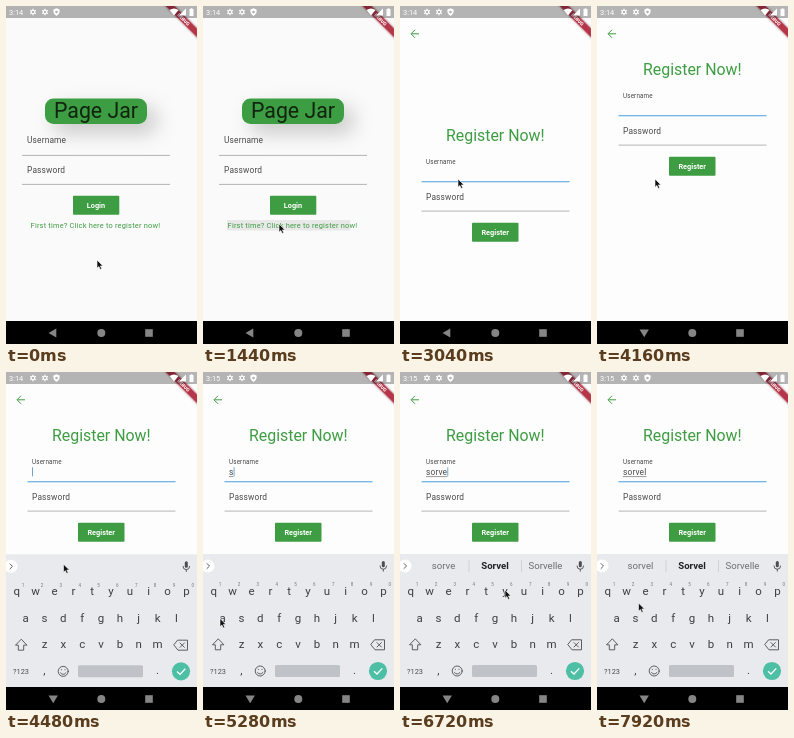
Write an HTML page that moves like this. It is 191 by 338 pixels and loops after 8 s.

```html
<!DOCTYPE html>
<html lang="en">
<head>
<meta charset="utf-8">
<title>Sign-up screen</title>
<style>
html, body { margin: 0; width: 100%; height: 100%; overflow: hidden; background: #fafafa; }
svg { display: block; width: 100vw; height: 100vh; font-family: Roboto, sans-serif; }
.mid { text-anchor: middle; }
.label { font-size: 8.4px; letter-spacing: .15px; fill: #4a4a4a; }
.btn { font-size: 7.3px; font-weight: 700; fill: #fff; text-anchor: middle; }
.green { fill: #3e9d42; }
.rule { stroke: #969696; stroke-width: .7; }
.icon { fill: none; stroke: #4a4e52; stroke-width: .9; stroke-linejoin: round; stroke-linecap: round; }
.key { font-size: 11.5px; fill: #3c4044; text-anchor: middle; }
.digit { font-size: 4.5px; fill: #74787c; text-anchor: middle; }
.hint { font-size: 9.6px; fill: #6a6e73; text-anchor: middle; }
</style>
</head>
<body>
<svg viewBox="0 0 191 338" preserveAspectRatio="none">
  <defs>
    <filter id="glow" x="-50%" y="-150%" width="200%" height="400%">
      <feDropShadow dx="9" dy="9" stdDeviation="10" flood-opacity=".2"/>
    </filter>
    <filter id="soft" x="-20%" y="-100%" width="140%" height="300%">
      <feDropShadow dx="0" dy="0" stdDeviation="1" flood-opacity=".45"/>
    </filter>
    <clipPath id="linkBox"><rect x="24" y="214" width="132" height="10.5"/></clipPath>
    <path id="gear" d="M0-3.2V3.2M-2.8-1.6 2.8 1.6M-2.8 1.6 2.8-1.6" stroke="#fff" stroke-width="1.3"/>
  </defs>

  <g id="login">
    <rect width="191" height="338" fill="#fafafa"/>
    <rect class="green" x="39" y="92.5" width="102" height="25.5" rx="8.5" filter="url(#glow)"/>
    <text class="mid" x="90" y="112.4" font-size="21.3" fill="#10240f">Page Jar</text>
    <text class="label" x="21" y="137.3">Username</text>
    <path class="rule" d="M16 149.4H164M16 178.4H164"/>
    <text class="label" x="21" y="166.5">Password</text>
    <rect class="green" x="67" y="189.8" width="46.3" height="19" rx="1"/>
    <text class="btn" x="90" y="201.8">Login</text>
    <g clip-path="url(#linkBox)"><circle id="ripple" cx="77" cy="219" fill="#000" opacity=".07"/></g>
    <text class="green" x="24.6" y="221.5" font-size="7.43" letter-spacing=".2">First time? Click here to register now!</text>
  </g>

  <g id="register">
    <rect width="191" height="338" fill="#fdfdfd"/>
    <path d="M19 27.8H11.3M15 23.8 11 27.8 15 31.8" fill="none" stroke="#3e9d42" stroke-width="1"/>
    <g id="form">
      <text class="mid green" x="95.3" y="135" font-size="15.9">Register Now!</text>
      <text id="userLabel" class="label" x="26">Username</text>
      <text id="typed" class="label" x="26" y="168.9"></text>
      <path id="compose" stroke="#555" stroke-width=".6"/>
      <rect id="caret" y="161.3" width=".8" height="9" fill="#4a92c8"/>
      <path id="userRule" d="M21.5 175.8H169.5"/>
      <text class="label" x="26" y="193.7">Password</text>
      <path class="rule" d="M21.5 205.1H169.5"/>
      <rect class="green" x="72" y="216.7" width="46.5" height="19" rx="1"/>
      <text class="btn" x="95.2" y="228.8">Register</text>
    </g>
  </g>

  <g id="keyboard">
    <rect y="182" width="191" height="134" fill="#e8eaed"/>
    <circle cx="5" cy="194" r="6.5" fill="#fff"/>
    <path class="icon" d="M4 191.5 6.5 194 4 196.5"/>
    <rect x="178.8" y="189" width="3" height="6.3" rx="1.5" fill="#4a4e52"/>
    <path class="icon" d="M177 194a3.3 3.3 0 0 0 6.6 0M180.3 197.3V199.2"/>
    <g id="hints">
      <path d="M69 188V200M121.5 188V200" stroke="#c4c7ca" stroke-width=".7"/>
      <text id="hint" class="hint" x="43.5" y="197.4"></text>
      <text class="hint" x="95" y="197.4" style="font-weight:700;fill:#202124">Sorvel</text>
      <text class="hint" x="145.5" y="197.4">Sorvelle</text>
    </g>
    <g id="keys"></g>
    <path class="icon" d="M15 267.1 9.5 272.8H12.3V277.8H17.7V272.8H20.5Z"/>
    <path class="icon" d="M172 267.8H181.5V277.8H172L168 272.8ZM174 270.6 178.4 275M178.4 270.6 174 275"/>
    <text class="mid" x="15" y="301.6" font-size="7.4" fill="#4a4e52">?123</text>
    <text class="key" x="38.5" y="302">,</text>
    <circle class="icon" cx="57.2" cy="299" r="5"/>
    <path class="icon" d="M54.5 300.5Q57.2 303.7 59.9 300.5M55.4 297.3V297.5M59 297.3V297.5"/>
    <rect x="72" y="293" width="65" height="12" rx="1.5" fill="#bfc3c7"/>
    <text class="key" x="151.5" y="302">.</text>
    <circle cx="175" cy="299" r="9.1" fill="#4dbfa4"/>
    <path d="M171 299.2 174 302 179.3 296.4" fill="none" stroke="#fff" stroke-width="1.3"/>
  </g>

  <g transform="translate(191 0) rotate(45)">
    <rect x="-26" y="15.8" width="52" height="6.4" fill="#b5364a" filter="url(#soft)"/>
    <text class="mid" y="20.7" font-size="4.7" font-weight="900" fill="#fff">DEBUG</text>
  </g>
  <rect width="191" height="12" opacity=".29"/>
  <text id="clock" x="3" y="9.2" font-size="7.4" fill="#fff"></text>
  <use href="#gear" x="27" y="6"/><circle cx="27" cy="6" r="1.7" fill="#b3b3b3" stroke="#fff"/>
  <use href="#gear" x="39" y="6"/><circle cx="39" cy="6" r="1.7" fill="#b3b3b3" stroke="#fff"/>
  <path d="M50.5 2.2 53.6 3.4V6Q53.2 8.8 50.5 9.9 47.8 8.8 47.4 6V3.4Z" fill="#fff"/>
  <circle cx="50.5" cy="6" r="1.3" fill="#b3b3b3"/>
  <g fill="#fff">
    <path d="M163.5 4Q168 .8 172.5 4L168 9.5Z"/>
    <path d="M180 2.5V9.5H173Z"/>
    <path d="M183.5 3H184.7V2.2H186.3V3H187.5V10H183.5Z"/>
  </g>

  <rect y="315" width="191" height="23" fill="#000"/>
  <path id="back" fill="#858585"/>
  <circle cx="95.3" cy="327" r="4" fill="#858585"/>
  <rect x="139.2" y="323.2" width="7.6" height="7.6" fill="#858585"/>

  <path id="mouse" d="M0 0V8.2L1.9 6.5 3.2 9.4 4.7 8.7 3.4 5.9H6Z" fill="#111" stroke="#fff" stroke-width=".6"/>
</svg>
<script>
const $ = id => document.getElementById(id);
const set = (id, attrs) => { for (const k in attrs) $(id).setAttribute(k, attrs[k]); };
const show = (id, on) => set(id, { visibility: on ? 'visible' : 'hidden' });
const ramp = (t, from, to) => Math.min(1, Math.max(0, (t - from) / (to - from)));
const easeOut = p => 1 - (1 - p) ** 3;
const smooth = p => p * p * (3 - 2 * p);

const LOOP = 8000, NAME = 'sorvel';
const STROKES = [4880, 5360, 5680, 6000, 6480, 7120];
// time, x, y of the pointer tip
const PATH = [
  [80, 91, 254], [1200, 76, 218], [2160, 76, 218], [2560, 58, 173],
  [4320, 58, 173], [4800, 56, 246], [5040, 56, 246], [5240, 17, 246.5],
  [5380, 17, 246.5], [5620, 131, 273], [5700, 131, 273], [5920, 141, 220],
  [6060, 141, 220], [6400, 47, 219], [6500, 47, 219], [6720, 105, 218],
  [6960, 170, 246], [7360, 170, 246], [7860, 41.5, 231]
];

function buildKeys() {
  const rows = [['qwertyuiop', 10.8, 222.9], ['asdfghjkl', 19.6, 249.5], ['zxcvbnm', 38.5, 276]];
  let html = '';
  for (const [letters, x0, y] of rows)
    [...letters].forEach((c, i) => {
      const x = x0 + i * 18.85;
      html += `<text class="key" x="${x}" y="${y}">${c}</text>`;
      if (letters.length === 10)
        html += `<text class="digit" x="${x + 6.3}" y="214.3">${(i + 1) % 10}</text>`;
    });
  $('keys').innerHTML = html;
}

function pointer(t) {
  const i = PATH.findIndex(p => p[0] > t);
  if (i < 0) return PATH.at(-1).slice(1);
  if (i === 0) return PATH[0].slice(1);
  const [a, b] = [PATH[i - 1], PATH[i]];
  const p = smooth(ramp(t, a[0], b[0]));
  return [a[1] + (b[1] - a[1]) * p, a[2] + (b[2] - a[2]) * p];
}

function caretOn(t, count) {
  if (count) return t - STROKES[count - 1] < 500;
  return [[2720, 3040], [3520, 3760], [4240, 4740]].some(([a, b]) => t >= a && t < b);
}

function draw(t) {
  const enter = ramp(t, 1520, 1840);
  set('ripple', { r: t < 1360 ? 0 : 80 * easeOut(ramp(t, 1360, 1520)) });
  show('register', enter > 0);
  set('register', { opacity: enter * enter, transform: `translate(0 ${84 * (1 - easeOut(enter))})` });
  set('form', { transform: `translate(0 ${t < 4000 ? 0 : -66})` });

  const focus = smooth(ramp(t, 2680, 2880));
  set('userLabel', { y: 164.4 - 6.3 * focus });
  $('userLabel').style.fontSize = 8.4 - 2.1 * focus + 'px';
  set('userRule', { stroke: t < 2720 ? '#969696' : '#4a9fdf', 'stroke-width': .7 + .4 * focus });

  const count = STROKES.filter(s => s <= t).length;
  const text = NAME.slice(0, count);
  $('typed').textContent = text;
  const end = 26 + (count ? $('typed').getComputedTextLength() : 0);
  set('compose', { d: count ? `M26 170.6H${end}` : '' });
  set('caret', { x: end + .2, opacity: caretOn(t, count) ? 1 : 0 });

  show('keyboard', t >= 4240);
  set('keyboard', { transform: `translate(0 ${133 * (1 - easeOut(ramp(t, 4240, 4520)))})` });
  set('hints', { opacity: count > 3 ? 1 : 0 });
  $('hint').textContent = text;

  $('clock').textContent = t < 4640 ? '3:14' : '3:15';
  set('back', { d: t < 3760 ? 'M50.3 322.5V331.5L42.5 327Z' : 'M42.5 323.4H51.9L47.2 331.2Z' });
  set('mouse', { transform: `translate(${pointer(t)})` });
}

function tick() {
  draw(performance.now() % LOOP);
  requestAnimationFrame(tick);
}

buildKeys();
tick();
</script>
</body>
</html>
```
